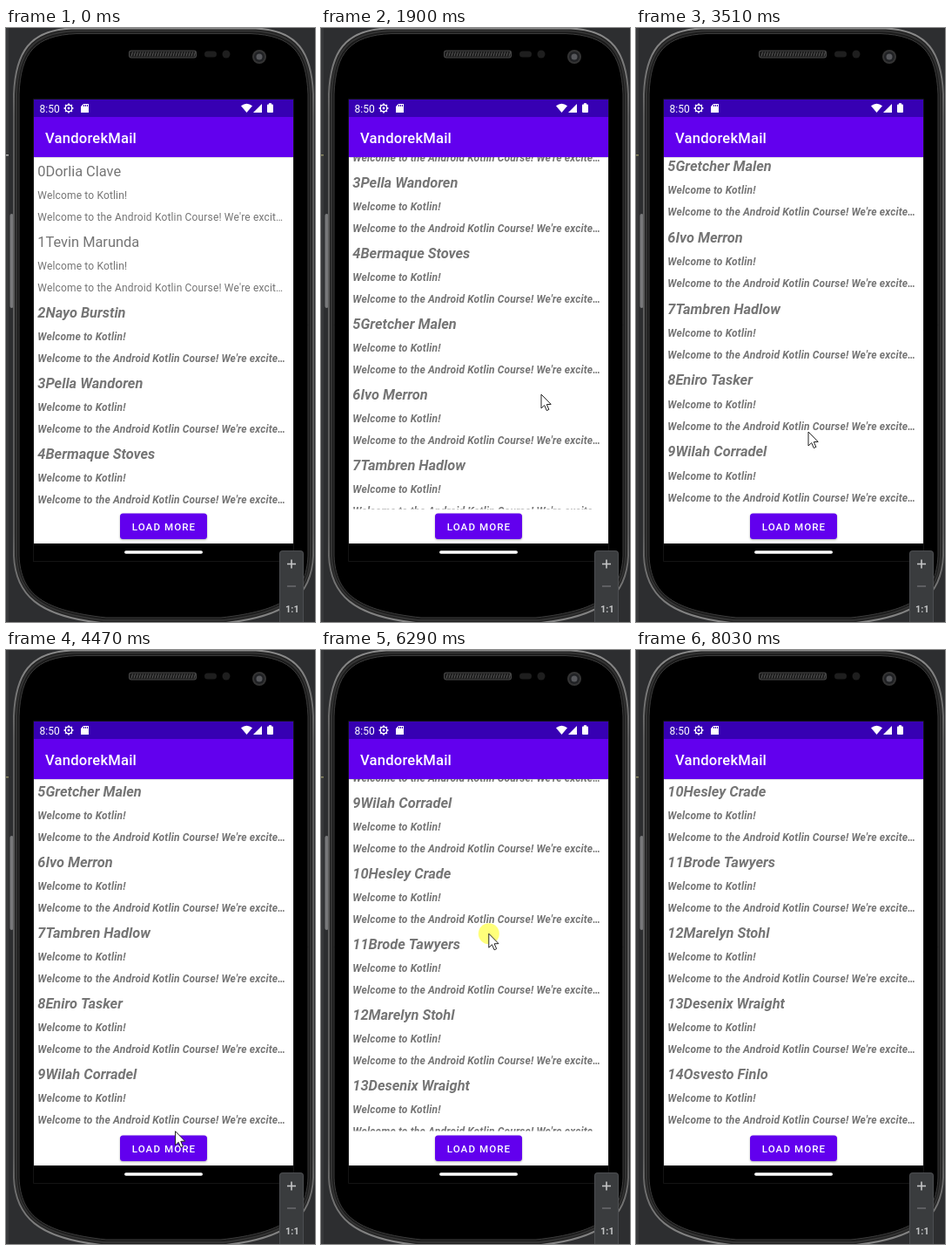
Animation of 355x681 px, one loop 8960 ms. Source, as an HTML page with a canvas:

```html
<!DOCTYPE html>
<html lang="en">
<head>
<meta charset="utf-8">
<style>
  html, body { margin: 0; width: 355px; height: 681px; overflow: hidden; background: #2d2e30; }
  canvas { display: block; }
</style>
</head>
<body>
<canvas id="stage" width="355" height="681"></canvas>
<script>
const ctx = document.getElementById('stage').getContext('2d');
const LOOP = 8960;
const TICK = 70;
const PURPLE = '#6200ee';
const GREY = '#757575';
const FONT = 'Roboto, sans-serif';
const LIST = { x: 32, top: 148, bottom: 551.5, width: 298, pitch: 81 };
const SENDERS = [
  'Dorlia Clave', 'Tevin Marunda', 'Nayo Burstin', 'Pella Wandoren', 'Bermaque Stoves',
  'Gretcher Malen', 'Ivo Merron', 'Tambren Hadlow', 'Eniro Tasker', 'Wilah Corradel',
  'Hesley Crade', 'Brode Tawyers', 'Marelyn Stohl', 'Desenix Wraight', 'Osvesto Finlo'
];

// Where the pointer turns or rests.
const STOPS = [
  { t: 260, x: 332, y: 664 }, { t: 1090, x: 229, y: 493 },
  { t: 1900, x: 253, y: 420 }, { t: 2880, x: 228, y: 463 },
  { t: 3510, x: 198, y: 463 }, { t: 3930, x: 198, y: 571 },
  { t: 4340, x: 198, y: 571 }, { t: 4900, x: 183, y: 488 },
  { t: 5500, x: 183, y: 390 }, { t: 6010, x: 190, y: 545 },
  { t: 6410, x: 194, y: 231 }, { t: 6640, x: 194, y: 231 },
  { t: 7000, x: 197, y: 460 }, { t: 7400, x: 200, y: 310 },
  { t: 7960, x: 260, y: 684 }
];

const during = (t, from, to) => t >= from && t < to;
const ramp = (t, from, to) => Math.min(1, Math.max(0, (t - from) / (to - from)));
const bump = (t, from, to) => Math.sin(Math.PI * ramp(t, from, to));

// Wheel scroll to the end of ten messages, then two drags through the new ones.
const scrollAt = t => 407 * ramp(t, 1090, 2525) + 92 * ramp(t, 4940, 5500) + 313 * ramp(t, 6010, 6410);
const stretchAt = t => 0.012 * bump(t, 2950, 3860) + 0.03 * bump(t, 7060, 7820);
const pressedAt = t => during(t, 4270, 4410) || during(t, 4900, 5500) ||
  during(t, 6010, 6440) || during(t, 7060, 7440);

function pointerAt(t) {
  const i = STOPS.findIndex(stop => stop.t > t);
  if (i < 1) return null;
  const a = STOPS[i - 1], b = STOPS[i];
  const u = ramp(t, a.t, b.t);
  return { x: a.x + (b.x - a.x) * u, y: a.y + (b.y - a.y) * u };
}

function quantize(t) {
  const phase = t < 4200 ? 10 : 60;
  return Math.max(0, Math.floor((t - phase) / TICK + 1e-6) * TICK + phase);
}

function box(x, y, w, h, color, r = 0) {
  ctx.fillStyle = color;
  ctx.beginPath();
  ctx.roundRect(x, y, w, h, r);
  ctx.fill();
}

function disc(x, y, r, color) {
  ctx.fillStyle = color;
  ctx.beginPath();
  ctx.arc(x, y, r, 0, Math.PI * 2);
  ctx.fill();
}

function line(color, width, ...points) {
  ctx.strokeStyle = color;
  ctx.lineWidth = width;
  ctx.beginPath();
  points.forEach(([x, y]) => ctx.lineTo(x, y));
  ctx.stroke();
}

function polygon(color, ...points) {
  ctx.fillStyle = color;
  ctx.beginPath();
  points.forEach(([x, y]) => ctx.lineTo(x, y));
  ctx.closePath();
  ctx.fill();
}

function text(str, x, y, size, color, style = '', spacing = 0) {
  ctx.font = `${style} ${size}px ${FONT}`;
  ctx.letterSpacing = spacing + 'px';
  ctx.fillStyle = color;
  ctx.fillText(str, x, y);
}

function bodyLayer(inset, fill, stroke, width) {
  const l = 9 + inset, r = 353 - inset, top = 0.5 + inset, bottom = 682 - inset;
  ctx.beginPath();
  ctx.moveTo(l, 76);
  ctx.bezierCurveTo(l + 2, 28, l + 18, top + 2, l + 66, top);
  ctx.lineTo(r - 66, top);
  ctx.bezierCurveTo(r - 18, top + 2, r - 2, 28, r, 76);
  ctx.lineTo(r, 605);
  ctx.bezierCurveTo(r - 2, 650, r - 28, bottom - 8, r - 100, bottom);
  ctx.lineTo(l + 100, bottom);
  ctx.bezierCurveTo(l + 28, bottom - 8, l + 2, 650, l, 605);
  ctx.closePath();
  ctx.fillStyle = fill;
  ctx.fill();
  ctx.strokeStyle = stroke;
  ctx.lineWidth = width;
  ctx.stroke();
}

function drawPhone(t) {
  box(0, 0, 355, 681, '#2d2e30');
  box(0, 0, 3, 681, '#38393b');
  box(0, 145, 3, 1.5, t >= 1160 ? '#8d8a62' : '#b5b5b5');
  box(4.5, 213, 4, 108, '#77787a', 2);

  const rim = ctx.createLinearGradient(0, 0, 0, 681);
  rim.addColorStop(0, '#8c8c8c');
  rim.addColorStop(0.15, '#5c5c5c');
  rim.addColorStop(0.85, '#5c5c5c');
  rim.addColorStop(1, '#858585');
  bodyLayer(0, '#202020', rim, 2);
  bodyLayer(3, '#1a1a1a', '#333', 2);
  bodyLayer(6, '#000', '#3c3c3c', 1);

  box(141, 25.5, 78, 9, '#4a4a4a', 3);
  box(142, 26.5, 76, 7, '#1c1c1c', 2);
  for (let x = 144; x < 217; x += 3) {
    line('#565656', 1, [x, 32.5], [x + 1.5, 27.5]);
  }
  box(228, 26.5, 14, 7, '#1e1e1e', 3.5);
  disc(253, 30, 4.5, '#1e1e1e');
  disc(291, 33, 8, '#343434');
  disc(291, 33, 6, '#202124');
  disc(291, 33, 3.5, '#56575b');
  ctx.strokeStyle = '#141414';
  ctx.lineWidth = 1;
  ctx.strokeRect(31.5, 81.5, 299, 530);
}

function drawStatusBar() {
  box(32, 82, 298, 20, '#3700b3');
  text('8:50', 38.5, 96.5, 12, '#fff');

  for (let i = 0; i < 8; i++) {
    const a = i * Math.PI / 4, c = Math.cos(a), s = Math.sin(a);
    line('#fff', 1.8, [72 + c * 3.6, 92 + s * 3.6], [72 + c * 5.4, 92 + s * 5.4]);
  }
  ctx.lineWidth = 1.3;
  ctx.beginPath();
  ctx.arc(72, 92, 3.8, 0, Math.PI * 2);
  ctx.stroke();
  disc(72, 92, 1.4, '#fff');

  polygon('#fff', [89, 87], [95, 87], [95, 97], [86, 97], [86, 90]);
  for (let x = 89; x < 94; x += 2) box(x, 88, 1, 2, '#3700b3');

  ctx.fillStyle = '#fff';
  ctx.beginPath();
  ctx.moveTo(276.5, 97);
  ctx.lineTo(270, 89.3);
  ctx.quadraticCurveTo(276.5, 84.2, 283, 89.3);
  ctx.fill();
  polygon('#fff', [284, 97], [294, 97], [294, 87]);
  box(300, 87.5, 7, 9.5, '#fff', 1);
  box(302, 86.2, 3, 2, '#fff');
}

function drawList(scroll, stretch) {
  const { x, top, bottom, width, pitch } = LIST;
  ctx.save();
  ctx.beginPath();
  ctx.rect(x, top, width, bottom - top);
  ctx.clip();
  ctx.translate(0, bottom);
  ctx.scale(1, 1 + stretch);
  ctx.translate(0, -bottom);
  SENDERS.forEach((name, i) => {
    const y = top + i * pitch - scroll;
    const unread = i > 1;
    const style = unread ? 'italic bold' : '';
    const ending = unread ? 'excite…' : 'excit…';
    text(i + name, 36.3, y + 22, 16.4, GREY, style);
    text('Welcome to Kotlin!', 36.3, y + 48, 12, GREY, style, 0.16);
    text("Welcome to the Android Kotlin Course! We're " + ending, 36.3, y + 73, 12, GREY, style, 0.16);
  });
  ctx.restore();
}

function drawScreen(t) {
  box(32, 102, 298, 489, '#fff');
  drawList(scrollAt(t), stretchAt(t));
  drawStatusBar();
  box(32, 102, 298, 46, PURPLE);
  box(32, 148, 298, 1, 'rgba(0,0,0,.12)');
  text('VandorekMail', 45, 131.7, 16.6, '#fff', '500', 0.2);

  ctx.save();
  ctx.shadowColor = 'rgba(0,0,0,.3)';
  ctx.shadowBlur = 2.5;
  ctx.shadowOffsetY = 1;
  box(131, 556.5, 100, 29.5, PURPLE, 3.5);
  ctx.restore();
  text('LOAD MORE', 144.7, 576, 11.6, '#fff', '500', 1.06);

  box(32, 591, 298, 20, '#000');
  box(136, 599.2, 90, 3.6, '#fff', 1.8);
}

function drawZoomPanel() {
  box(314, 599, 28, 90, '#4c4e51', 4);
  box(315, 600, 26, 90, '#3a3c3e', 3);
  line('#c4c5c6', 1.6, [323, 614.5], [333, 614.5]);
  line('#c4c5c6', 1.6, [328, 609.5], [328, 619.5]);
  line('#68696b', 1.6, [323, 640], [333, 640]);
  text('1:1', 321, 670, 11, '#c4c5c6', 'bold');
}

function drawPointer(t) {
  const tip = pointerAt(t);
  if (!tip) return;
  if (pressedAt(t)) disc(tip.x, tip.y, 12, 'rgba(255,255,40,.62)');
  const arrow = [[0, 0], [0, 16], [3.7, 12.6], [6.3, 18.6], [8.9, 17.4], [6.3, 11.6], [11.2, 11.4]]
    .map(([dx, dy]) => [tip.x + dx, tip.y + dy]);
  polygon('#fff', ...arrow);
  ctx.lineJoin = 'round';
  line('#222', 1, ...arrow, arrow[0]);
}

const start = performance.now();

function render(now) {
  const elapsed = Math.max(0, now - start) % LOOP;
  const t = quantize(elapsed);
  drawPhone(t);
  drawScreen(t);
  drawZoomPanel();
  drawPointer(t);
  requestAnimationFrame(render);
}

requestAnimationFrame(render);
</script>
</body>
</html>
```
